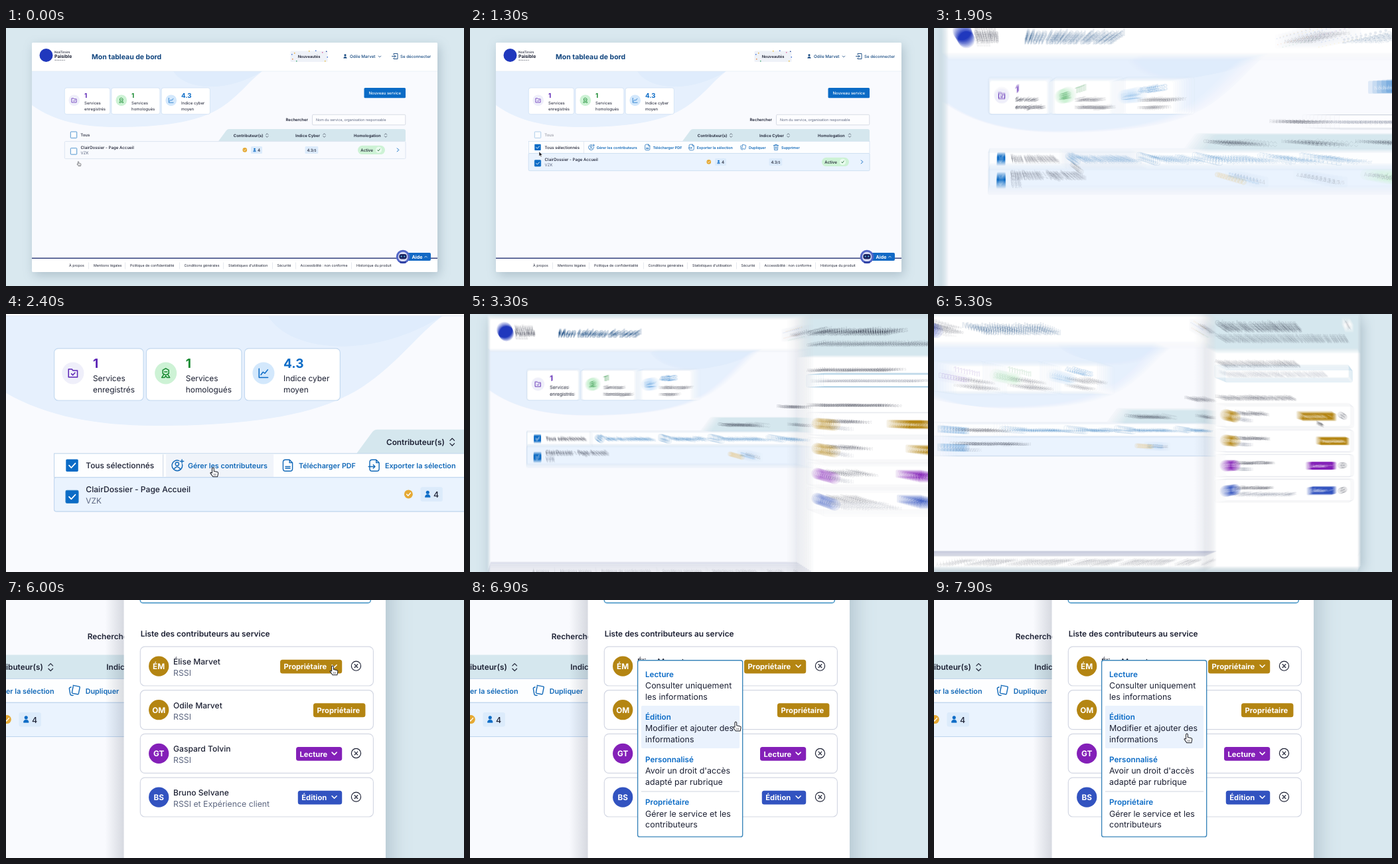
An HTML page that plays this animation: 690x388 px, repeating every 8000 ms.

```html
<!DOCTYPE html>
<html lang="fr">
<head>
<meta charset="utf-8">
<style>
html, body { margin: 0; width: 100%; height: 100%; overflow: hidden; background: #d9e8ef; }
svg { display: block; width: 690px; height: 388px; }
text { font-family: Inter, "Open Sans", sans-serif; text-rendering: geometricPrecision; white-space: pre; }
</style>
</head>
<body>
<svg id="stage" viewBox="0 0 690 388"></svg>
<script>
const INK = '#1c2033', GREY = '#5d6780', BLUE = '#0b6bc6', LINK = '#1269b8', NAVY = '#12467f', TEAL = '#d5e7ee';
const GOLD = '#b48512', PURPLE = '#8420b8', INDIGO = '#3253c0';

// Drawing helpers
const rect = (x, y, w, h, fill, r = 0, stroke = 'none', sw = .6) =>
  `<rect x="${x}" y="${y}" width="${w}" height="${h}" rx="${r}" fill="${fill}" stroke="${stroke}" stroke-width="${sw}"/>`;
const text = (x, y, str, size = 6, weight = 400, fill = INK, anchor = 'start') =>
  `<text x="${x}" y="${y}" font-size="${size}" font-weight="${weight}" fill="${fill}" text-anchor="${anchor}">${str}</text>`;
const disc = (x, y, r, fill, stroke = 'none', sw = .7) =>
  `<circle cx="${x}" cy="${y}" r="${r}" fill="${fill}" stroke="${stroke}" stroke-width="${sw}"/>`;
const line = (d, stroke, sw = .8, fill = 'none') =>
  `<path d="${d}" fill="${fill}" stroke="${stroke}" stroke-width="${sw}" stroke-linecap="round" stroke-linejoin="round"/>`;
const at = (x, y, body, k = 1) => `<g transform="translate(${x} ${y}) scale(${k})">${body}</g>`;
const group = (id, body) => `<g id="${id}">${body}</g>`;

const chevron = (x, y, color, dir = 1) => line(`M${x - 1.8} ${y - .9 * dir}l1.8 ${1.8 * dir}l1.8 ${-1.8 * dir}`, color, .8);
const sortMark = x => line(`M${x - 1.7} 160.4l1.7-1.7l1.7 1.7M${x - 1.7} 162.6l1.7 1.7l1.7-1.7`, INK, .6);
const person = (x, y, color, k = 1) =>
  disc(x, y - 1.4 * k, 1.3 * k, color) + line(`M${x - 1.9 * k} ${y + 2.2 * k}q0-1.9 ${1.9 * k}-1.9t${1.9 * k} 1.9z`, color, .4, color);
const emptyBox = (x, y) => rect(x - 4.7, y - 4.7, 9.4, 9.4, '#fff', .8, '#3f8bcb', .9);
const tickedBox = (x, y) =>
  rect(x - 4.7, y - 4.7, 9.4, 9.4, BLUE, .8) + line(`M${x - 2.3} ${y}l1.7 1.8l3.1-3.4`, '#fff', .9);

function header() {
  const confetti = [[430, 39, '#2c62d0'], [434, 37, '#e6a020'], [431, 46, '#e27b35'], [437, 49, '#3aa76d'],
    [456, 34, '#e9b82a'], [466, 33.5, '#2c62d0'], [476, 36, '#d65a9c'], [482, 34.5, '#1e3f94'], [480, 49, '#e9b82a'], [483.5, 43, '#2c62d0']];
  return rect(39, 22, 611, 43, '#fff') + rect(39, 64.7, 611, .6, '#dfe6f2') +
    disc(60.5, 41, 10, '#2038bd') +
    text(73, 38, 'NosTiroirs', 4.8, 500) + text(73, 45, 'Paisible', 6.9, 700) + text(73, 49, 'Version en essai', 2.1) +
    text(129, 46.8, 'Mon tableau de bord', 10.5, 700, NAVY) +
    rect(428.5, 34.5, 56, 16.5, '#eff2f8', 1.5) +
    confetti.map(([x, y, c]) => rect(x, y, 1.5, 1.5, c, .5)).join('') +
    text(456.5, 45, 'Nouveautés', 5.8, 600, INK, 'middle') +
    person(511, 42.5, NAVY, 1.2) + text(518, 45, 'Odile Marvet', 6.3, 500, NAVY) + chevron(563, 43, NAVY) +
    line('M584 40v-1.5h6v8h-6v-1.5M581.5 42.5h5.5m-1.8-1.8l1.8 1.8l-1.8 1.8', NAVY, .9) +
    text(594, 45, 'Se déconnecter', 6.1, 500, NAVY);
}

function statCard(x, w, iconX, tint, color, icon, value, label) {
  return rect(x, 90, w, 39.7, '#fff', 3, '#c3d9f0') + disc(iconX, 108.8, 8.4, tint) +
    at(iconX, 108.8, line(icon, color, .9), .85) + text(iconX + 15.3, 104.6, value, 9.7, 700, color) +
    label.map((s, i) => text(iconX + 15.3, 115 + i * 8.6, s, 6.05)).join('');
}

function dashboard() {
  const links = [[95, 'À propos'], [132, 'Mentions légales'], [187, 'Politique de confidentialité'], [268.5, 'Conditions générales'],
    [335, "Statistiques d'utilisation"], [408.5, 'Sécurité'], [443.5, 'Accessibilité : non conforme'], [528, 'Historique du produit']];
  return '<path d="M39 65V116C72 140 115 149 165 149C235 149 290 142 325 119C352 101 366 80 386 65Z" fill="#e6f0fd"/>' +
    '<path d="M252 65C268 92 330 100 386 65Z" fill="#dfecfc"/>' +
    statCard(88.3, 68.4, 102.7, '#efeffa', '#5c25b5', 'M-4-3.5h3l1 1.2h4v6h-8zM-1.4.6l1.2 1.2l2-2.2', '1', ['Services', 'enregistrés']) +
    statCard(158.9, 73, 173.8, '#cdf2d5', '#16892f', 'M0-4.2l2.7 1.5v3l-2.7 1.5l-2.7-1.5v-3zM-1.2-1.2h2.4M-2 1.5l-1.6 2.5h2.5l1.1-1.4l1.1 1.4h2.5l-1.6-2.5', '1', ['Services', 'homologués']) +
    statCard(234.2, 73.2, 248.7, '#d3e8fc', BLUE, 'M-4-4v8h8M-2.4 1.6l2-2.6l1.6 1.2l2.6-3.2', '4.3', ['Indice cyber', 'moyen']) +
    rect(539.5, 90, 62.5, 15.2, BLUE, 1.5) + text(570.8, 100.3, 'Nouveau service', 6, 500, '#fff', 'middle') +
    text(421.5, 140, 'Rechercher', 6, 600) + rect(461.5, 130.3, 140.3, 15.5, '#fdfdff', 1.5, '#bfc6d4') +
    text(467, 140, 'Nom du service, organisation responsable', 5.3, 400, GREY) +
    `<path d="M320 170.3L332 154Q333.5 152 336 152H599Q602 152 602 155V170.3Z" fill="${TEAL}"/>` +
    text(342.8, 163.6, 'Contributeur(s)', 6, 600) + sortMark(393.3) +
    text(436, 163.6, 'Indice Cyber', 6, 600) + sortMark(479.5) +
    text(524, 163.6, 'Homologation', 6, 600) + sortMark(572) +
    group('all', emptyBox(102, 160.7) + text(112.3, 163.3, 'Tous', 6, 500)) +
    group('tools', toolbar()) + group('row', serviceRow()) +
    rect(39, 347, 611, 20, '#fff') + rect(39, 345.5, 611, 1.5, '#35427f') +
    links.map(([x, s], i) => text(x, 359.4, s, 5.3) + (i ? rect(x - 7.5, 352.5, .5, 10, '#cdd2dc') : '')).join('') +
    rect(600, 338, 40, 12, '#1269c5', 2) + text(611.5, 347, 'Aide', 7.1, 700, '#fff') + chevron(632.5, 344, '#fff', -1) +
    disc(598, 344, 10.3, '#5367c8') + disc(598, 344, 7.3, '#d9dcf5') + rect(592.3, 340, 11.4, 7.4, '#1b2461', 3.4) +
    disc(595.7, 343.4, 1, '#67d3f5') + disc(600.3, 343.4, 1, '#67d3f5') + rect(593, 351, 10, 2.4, '#2d3fa0', 1);
}

function toolbar() {
  const page = 'M1.5-4.8h-3.5q-2 0-2 2v5.600q0 2 2 2h4q2 0 2-2v-5zv2.500h2.500'.replace(/00/g, '0');
  const tools = [
    [182.6, 190.7, 'Gérer les contributeurs', 'M1.5-4a4.4 4.4 0 1 0 2.7 3M-2.7 3q2.7-3.5 5.2 0M-1.6-1.2a1.5 1.5 0 1 0 3 0a1.5 1.5 0 1 0-3 0M2.5-3.5h3m-1.5-1.5v3'],
    [267.3, 275.7, 'Télécharger PDF', page + 'M-2 1h4M-2 2.4h4'],
    [333.7, 341.8, 'Exporter la sélection', page + 'M-5 1h5.500m-1.5-1.5l1.5 1.5l-1.5 1.5'],
    [411.5, 420, 'Dupliquer', 'M-1-4.5l5 1q.8.200.6 1l-1 5q-.2.8-1 .6l-4-.8q-.8-.2-.6-1l1-5M-2.8-3q-1.8.5-1.500 1.500l.8 4.500q.300 1.300 2.500 1'],
    [461, 469, 'Supprimer', 'M-4.2-3.2h8.4M-1.6-3.2v-1.4h3.2v1.4M-3.2-3.2l.5 7.8h5.4l.5-7.8M-.9-1v3.6M.9-1v3.6']];
  return rect(88.3, 170.3, 513.7, 18.3, '#fdfeff', 0, '#bdd3ea', .5) +
    group('toolHover', rect(174, 170.6, 82.4, 17.7, '#f0f4fa')) +
    tickedBox(102, 179.4) + text(112.6, 181.7, 'Tous sélectionnés', 6.06, 500) + rect(171.5, 171, .5, 17, '#cbd6e5') +
    tools.map(([ix, tx, s, d]) => at(ix, 179.4, line(d, LINK, .8), .9) + text(tx, 181.7, s, 5.48, 600, LINK)).join('');
}

function serviceRow() {
  return rect(88.3, 170.6, 513.7, 26, '#f8fafe', 1.5, '#cbd7e9') +
    group('rowOn', rect(88.3, 170.6, 513.7, 26, '#eaf3fe', 1.5, '#bdd5ef', .5)) +
    emptyBox(102, 185.4) + group('rowTick', tickedBox(102, 185.4)) +
    text(112.6, 182, 'ClairDossier - Page Accueil', 6.15, 500) + text(112.6, 190.3, 'VZK', 6, 400, GREY) +
    disc(359.8, 183.4, 3.3, '#e5a934') + line('M358.4 183.4l1.1 1.2l1.9-2.2', '#fff', .7) +
    rect(369, 178, 17, 11, '#dcebfb', 1.5) + person(374.5, 183.4, BLUE) + text(379, 186, '4', 6.3, 500) +
    rect(450.5, 178, 19.8, 11, '#dcebfb', 1.5) + text(460.4, 185.9, '4.3<tspan font-size="5">/5</tspan>', 6, 500, INK, 'middle') +
    rect(530, 176.7, 41, 13.4, '#cdf2d5', 6.7) + text(534.3, 185.7, 'Active', 6.2, 500) +
    disc(561.5, 183.4, 4.6, '#e9fbee') + line('M559.8 183.7l1.2 1.3l2.2-3', '#175b2c', .8) +
    line('M589.3 180.9l2.5 2.5l-2.5 2.5', BLUE, 1);
}

function member(i, initials, name, role, color, badge, w, fixed) {
  const right = fixed ? 634.5 : 616.6;
  return at(0, 145.7 + 33.4 * i,
    rect(462, 0, 178.6, 30, '#fff', 3.5, '#d3d7e3') + disc(476.2, 15, 7.7, color) +
    text(476.2, 17.2, initials, 6, 700, '#fff', 'middle') +
    text(487.3, 13.7, name, 6.15, 500) + text(487.3, 22.3, role, 6.25, 400, GREY) +
    rect(right - w, 10, w, 10.6, color, 1.8) + text(right - w + 2.8, 17.4, badge, 5.72, 700, '#fff') +
    (fixed ? '' : chevron(610.7, 15, '#fff') + disc(627.4, 14.8, 3.6, '#fff', INK, .6) +
      line('M626.2 13.6l2.4 2.4m0-2.4l-2.4 2.4', INK, .6)));
}

function panel() {
  return rect(435, 22, 14.5, 345, 'url(#fade)') + rect(449.5, 22, 200.5, 345, '#fff') + rect(449.5, 22, 200.5, 50.5, TEAL) +
    text(461.7, 43.6, 'Gérer les contributeurs', 9.5, 700) +
    text(461.7, 58.2, 'Gérer la liste des personnes invitées à contribuer au service.', 6, 500) +
    rect(628, 31.7, 12.3, 11.8, '#fff', 1.5) + line('M632.5 35.9l3.4 3.4m0-3.4l-3.4 3.4', INK) +
    text(461.7, 92, 'Ajouter un ou plusieurs contributeurs', 5.85, 600) +
    rect(462, 95.4, 176.5, 16.9, '#fff', 2, '#4f9ac9', .8) +
    text(466.5, 106.1, 'Si nouveau contributeur email, sinon nom ou prénom', 5.55, 400, GREY) +
    text(462.2, 138, 'Liste des contributeurs au service', 6.06, 600) +
    member(0, 'ÉM', 'Élise Marvet', 'RSSI', GOLD, 'Propriétaire', 47.4) +
    member(1, 'OM', 'Odile Marvet', 'RSSI', GOLD, 'Propriétaire', 39.9, true) +
    member(2, 'GT', 'Gaspard Tolvin', 'RSSI', PURPLE, 'Lecture', 35.2) +
    member(3, 'BS', 'Bruno Selvane', 'RSSI et Expérience client', INDIGO, 'Édition', 33.8);
}

function menu() {
  const items = [['Lecture', 'Consulter uniquement', 'les informations'], ['Édition', 'Modifier et ajouter des', 'informations'],
    ['Personnalisé', "Avoir un droit d'accès", 'adapté par rubrique'], ['Propriétaire', 'Gérer le service et les', 'contributeurs']];
  return rect(487.6, 156.2, 80.4, 135, '#fff', 1.5, '#3b86ba', .7) +
    group('itemHover', rect(490.3, 191, 75.4, 32.5, '#eaf2fd', 1)) + rect(490.3, 256.3, 75.4, .5, '#cfd5e0') +
    items.map(([head, a, b], i) => at(493.4, 169 + 32.65 * i,
      text(0, 0, head, 5.95, 600, BLUE) + text(0, 8.7, a, 6.35) + text(0, 17.3, b, 6.35))).join('');
}

const pointers =
  group('arrow', line('M0 0v7l1.7-1.5l1.1 2.500l1.2-.5l-1.1-2.500h2.2z', '#fff', .6, '#16181f')) +
  group('hand', at(0, 0, line('M-.8.7q.8-1.3 1.6 0v2.5l3 .7q.9.3.7 1.3l-.6 2.8h-3.9l-2.3-3.1q0-1 1.5-.2z', '#22242c', .6, '#fff') +
    line('M1 5.5v1.5M2.3 5.5v1.5', '#22242c', .35), .88));

const stage = document.getElementById('stage');
const SAMPLES = 10, SHUTTER = 40;
stage.innerHTML =
  `<defs><linearGradient id="fade"><stop stop-color="#4a5568" stop-opacity="0"/><stop offset="1" stop-color="#4a5568" stop-opacity=".2"/></linearGradient>
  <clipPath id="page"><rect x="39" y="22" width="611" height="345" rx="2"/></clipPath></defs>
  <g class="view"><g id="world">` +
  rect(-400, -400, 1600, 1300, '#d9e8ef') +
  `<g style="filter:drop-shadow(3px 5px 8px rgba(60,90,110,.28))">${rect(39, 22, 611, 345, '#f9fafe', 2)}</g>` +
  `<g clip-path="url(#page)">${dashboard()}${header()}${group('panel', panel())}</g>` +
  group('menu', menu()) + group('cursor', pointers) + '</g></g>' +
  '<use class="view" href="#world"/>'.repeat(SAMPLES - 1);

const views = [...stage.querySelectorAll('.view')];
const part = id => document.getElementById(id);
const show = (id, on) => part(id).setAttribute('display', on ? 'inline' : 'none');
const clamp = p => Math.min(1, Math.max(0, p));
const ease = p => (p = clamp(p)) < .5 ? 4 * p ** 3 : 1 - (2 - 2 * p) ** 3 / 2;

// Zoom amount: in on the toolbar, quick settle back, in on the panel
function camera(t) {
  const toPanel = t >= 5000;
  const zoom = toPanel ? ease((t - 5050) / 750) : t < 3200 ? ease((t - 1620) / 590) : .5 * Math.exp((3180 - t) / 90);
  const e = zoom < .001 ? 0 : zoom;
  const [ox, oy] = toPanel ? [-706, -216.4] : [-101, -125];
  return `matrix(${1 + .966 * e} 0 0 ${1 + .966 * e} ${ox * e} ${oy * e})`;
}

const path = [[0, 109, 200.5], [150, 109, 200.5], [900, 104, 186], [1500, 104, 186], [2180, 217, 185], [2340, 217, 185], [2400, 210, 181],
  [3400, 210, 181], [4100, 592, 169], [5050, 592, 169], [5750, 609.4, 160.4], [6350, 609.4, 160.4], [7200, 552.9, 212.3], [8000, 552.9, 212.3]];

function pointerAt(t) {
  const i = path.findIndex(k => k[0] > t);
  const [t0, x0, y0] = path[i - 1], [t1, x1, y1] = path[i];
  const p = ease((t - t0) / (t1 - t0));
  return [x0 + (x1 - x0) * p, y0 + (y1 - y0) * p];
}

function render(t) {
  const selected = t >= 1150, open = t >= 3200, [x, y] = pointerAt(t);
  for (const id of ['tools', 'rowOn', 'rowTick']) show(id, selected);
  part('all').setAttribute('opacity', 1 - clamp((t - 1150) / 270));
  part('row').setAttribute('transform', `translate(0 ${selected ? 18 : 0})`);
  show('panel', open);
  show('menu', t >= 6200);
  const overTool = selected && !open && x > 174 && y < 188;
  show('toolHover', overTool);
  show('itemHover', x < 568 && y > 191);
  const hand = !selected || overTool || t > 5500;
  show('hand', hand);
  show('arrow', !hand);
  show('cursor', t < 3200 || t >= 3400);
  part('cursor').setAttribute('transform', `translate(${x} ${y})`);

  // Motion blur: average the view over a short shutter
  const start = open ? 3200 : 0, past = i => camera(Math.max(start, t - SHUTTER * i / (SAMPLES - 1)));
  const moving = past(0) !== past(SAMPLES - 1);
  views.forEach((v, i) => {
    v.setAttribute('display', i && !moving ? 'none' : 'inline');
    v.setAttribute('transform', past(moving ? i : 0));
    v.setAttribute('opacity', moving ? 1 / (i + 1) : 1);
  });
}

const begin = performance.now();
function tick() {
  render((performance.now() - begin) % 8000);
  requestAnimationFrame(tick);
}
tick();
</script>
</body>
</html>
```
